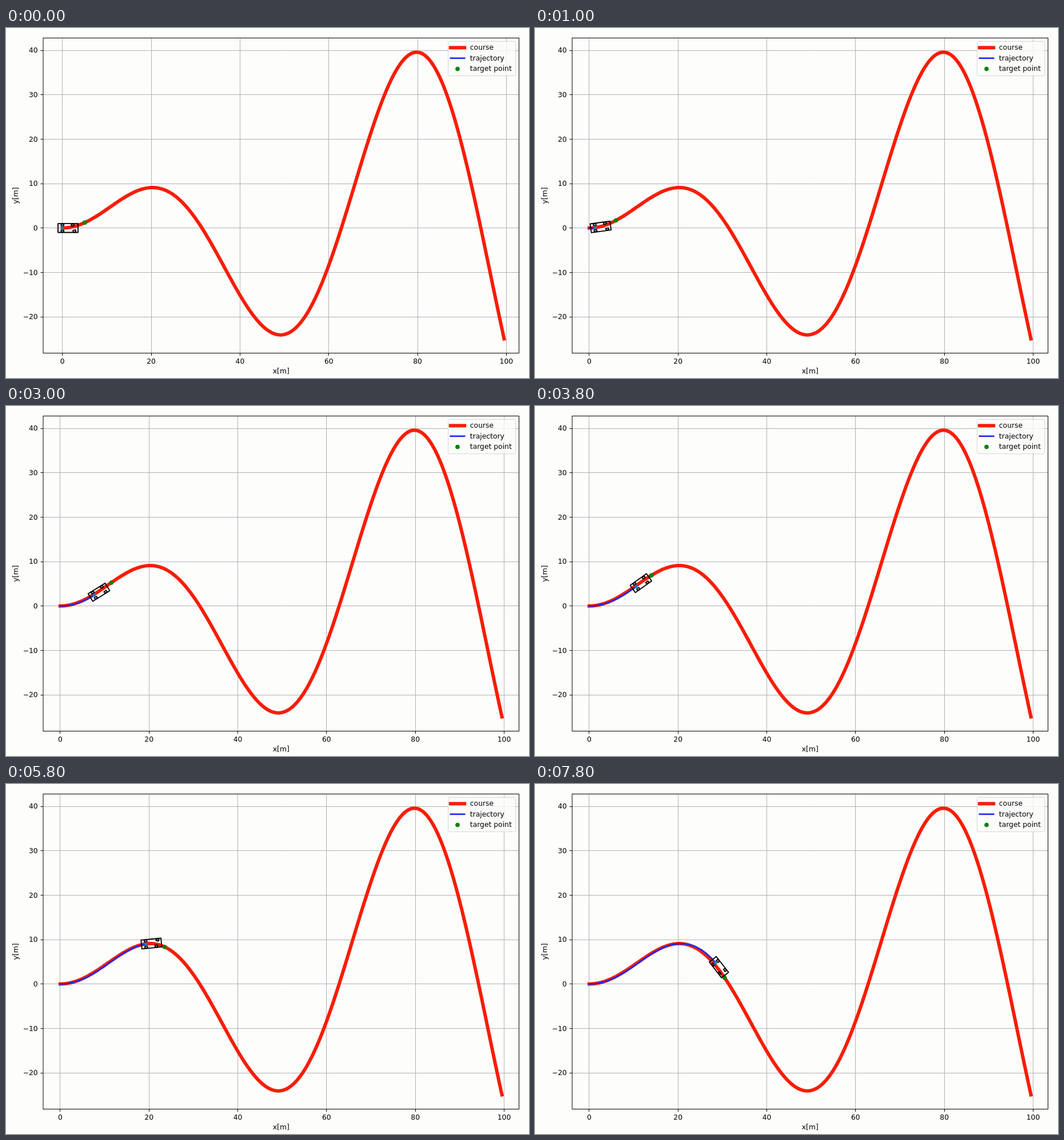
These frames come from a looping animation (915x612 px, 8 s). An HTML page with a canvas:

```html
<!DOCTYPE html>
<html lang="en">
<head>
<meta charset="utf-8">
<title>Path tracking</title>
<style>
html, body { margin: 0; width: 100%; height: 100%; overflow: hidden; background: #fdfdfc; }
canvas { display: block; width: 915px; height: 612px; }
</style>
</head>
<body>
<canvas id="stage" width="915" height="612"></canvas>
<script>
const ctx = document.getElementById('stage').getContext('2d');

const LOOP = 8000, STEP = 200, STEPS = LOOP / STEP;
const BOX = { l: 65, r: 897.5, t: 17.5, b: 568.5 };
const MID_X = (BOX.l + BOX.r) / 2, MID_Y = (BOX.t + BOX.b) / 2;
const ZERO_Y = 349.7, SCALE = 7.766;
const FONT = '12.35px "DejaVu Sans", sans-serif';
const RED = '#f71d04', BLUE = '#1c2bea', GREEN = '#068206', STAR = '#1f77b4';

// Car geometry in metres
const CAR = { length: 4.5, width: 2, back: 1, base: 2.5, tread: 0.7, wheelL: 0.3, wheelW: 0.2 };

// Course
const courseY = x => Math.sin(x / 10) * x / 2;
const course = Array.from({ length: 200 }, (_, i) => [i / 2, courseY(i / 2)]);
const COURSE_END = 99.5;

// Pure pursuit: steer towards the first course point beyond the look-ahead,
// more gently as the speed rises
function drive() {
  const states = [{ x: 0, y: 0, yaw: 0, steer: 0, target: course[0] }];
  let index = 0;
  for (let n = 0; n < STEPS; n++) {
    const { x, y, yaw } = states[n];
    const ahead = 5.05 - 0.0025 * n;
    while (Math.hypot(course[index][0] - x, course[index][1] - y) < ahead) index++;
    const target = course[index];
    const speed = 1 - 0.909 ** n;
    const alpha = Math.atan2(target[1] - y, target[0] - x) - yaw;
    const steer = Math.atan(2 * CAR.base * Math.sin(alpha) / (4.1 + 1.2 * speed));
    const dist = 1.1 * speed;
    states.push({
      x: x + dist * Math.cos(yaw),
      y: y + dist * Math.sin(yaw),
      yaw: yaw + dist / CAR.base * Math.tan(steer),
      steer, target
    });
  }
  return states;
}
const states = drive();

const rotate = ([x, y], a) => [
  x * Math.cos(a) - y * Math.sin(a),
  x * Math.sin(a) + y * Math.cos(a)
];
const rect = (x0, y0, x1, y1) => [[x0, y0], [x1, y0], [x1, y1], [x0, y1]];

function carShapes(s) {
  const place = p => {
    const [x, y] = rotate(p, s.yaw);
    return [x + s.x, y + s.y];
  };
  const { length, width, back, base, tread, wheelL, wheelW } = CAR;
  const shapes = [rect(-back, -width / 2, length - back, width / 2)];
  for (const side of [-tread, tread]) {
    const wheel = rect(-wheelL, side - wheelW, wheelL, side + wheelW);
    shapes.push(wheel, wheel.map(p => {
      const [x, y] = rotate(p, s.steer);
      return [x + base, y];
    }));
  }
  return shapes.map(shape => shape.map(place));
}

let zeroX = 0;
const px = x => zeroX + x * SCALE;
const py = y => ZERO_Y - y * SCALE;
const snap = v => Math.floor(v) + 0.5;

function stroke(points, color, width, closed) {
  ctx.beginPath();
  points.forEach(([x, y]) => ctx.lineTo(x, y));
  if (closed) ctx.closePath();
  ctx.strokeStyle = color;
  ctx.lineWidth = width;
  ctx.stroke();
}
const plot = (points, color, width, closed) =>
  stroke(points.map(([x, y]) => [px(x), py(y)]), color, width, closed);

function dot(x, y) {
  ctx.beginPath();
  ctx.arc(x, y, 3.8, 0, 2 * Math.PI);
  ctx.fillStyle = GREEN;
  ctx.fill();
}

function star(x, y) {
  ctx.beginPath();
  for (let i = 0; i < 10; i++) {
    const r = i % 2 ? 1.4 : 3.7, a = i * Math.PI / 5;
    ctx.lineTo(x + r * Math.sin(a), y - r * Math.cos(a));
  }
  ctx.closePath();
  ctx.fillStyle = ctx.strokeStyle = STAR;
  ctx.lineWidth = 1.2;
  ctx.fill();
  ctx.stroke();
}

function text(str, x, y, align) {
  ctx.fillStyle = '#000';
  ctx.textAlign = align;
  ctx.fillText(str, x, y);
}

function drawAxes() {
  ctx.lineCap = 'butt';
  for (let v = 0; v <= 100; v += 20) {
    const x = snap(px(v));
    stroke([[x, BOX.t], [x, BOX.b]], '#b2b2b5', 1);
    stroke([[x, BOX.b], [x, BOX.b + 4.5]], '#000', 1);
    text(String(v), px(v), 586.8, 'center');
  }
  for (let v = -20; v <= 40; v += 10) {
    const y = snap(py(v));
    stroke([[BOX.l, y], [BOX.r, y]], '#b2b2b5', 1);
    stroke([[BOX.l - 4.5, y], [BOX.l, y]], '#000', 1);
    text(String(v).replace('-', '\u2212'), 55.7, py(v) + 4.4, 'right');
  }
  text('x[m]', MID_X, 604, 'center');
  ctx.save();
  ctx.translate(21, MID_Y);
  ctx.rotate(-Math.PI / 2);
  text('y[m]', 0, 0, 'center');
  ctx.restore();
}

function drawLegend() {
  ctx.beginPath();
  ctx.roundRect(773.5, 23.5, 118, 60, 2.5);
  ctx.fillStyle = 'rgba(253,253,252,0.8)';
  ctx.fill();
  ctx.strokeStyle = '#d6d6d6';
  ctx.lineWidth = 1;
  ctx.stroke();
  ctx.lineCap = 'square';
  stroke([[777.8, 34.4], [802.2, 34.4]], RED, 6);
  stroke([[777.8, 52.8], [802.2, 52.8]], BLUE, 2.7);
  dot(790, 71.6);
  ['course', 'trajectory', 'target point'].forEach((label, i) =>
    text(label, 811.8, 38.4 + i * 18.4, 'left'));
}

function draw(n) {
  const s = states[n];
  const shapes = carShapes(s);
  // The view stays centred on everything drawn
  const minX = Math.min(0, ...shapes[0].map(p => p[0]));
  zeroX = MID_X - (minX + COURSE_END) / 2 * SCALE;

  ctx.fillStyle = '#fdfdfc';
  ctx.fillRect(0, 0, 915, 612);
  ctx.font = FONT;
  ctx.lineJoin = 'round';
  drawAxes();

  ctx.lineCap = 'square';
  plot(course, RED, 6);
  plot(states.slice(0, n + 1).map(p => [p.x, p.y]), BLUE, 2.7);
  dot(px(s.target[0]), py(s.target[1]));
  shapes.forEach(shape => plot(shape, '#000', 1.85, true));
  star(px(s.x), py(s.y));

  ctx.strokeStyle = '#000';
  ctx.lineWidth = 1;
  ctx.lineJoin = 'miter';
  ctx.strokeRect(BOX.l, BOX.t, BOX.r - BOX.l, BOX.b - BOX.t);
  drawLegend();
}

const start = performance.now();
function tick() {
  const t = (performance.now() - start) % LOOP;
  draw(Math.floor(t / STEP) + 1);
  requestAnimationFrame(tick);
}
tick();
</script>
</body>
</html>
```
